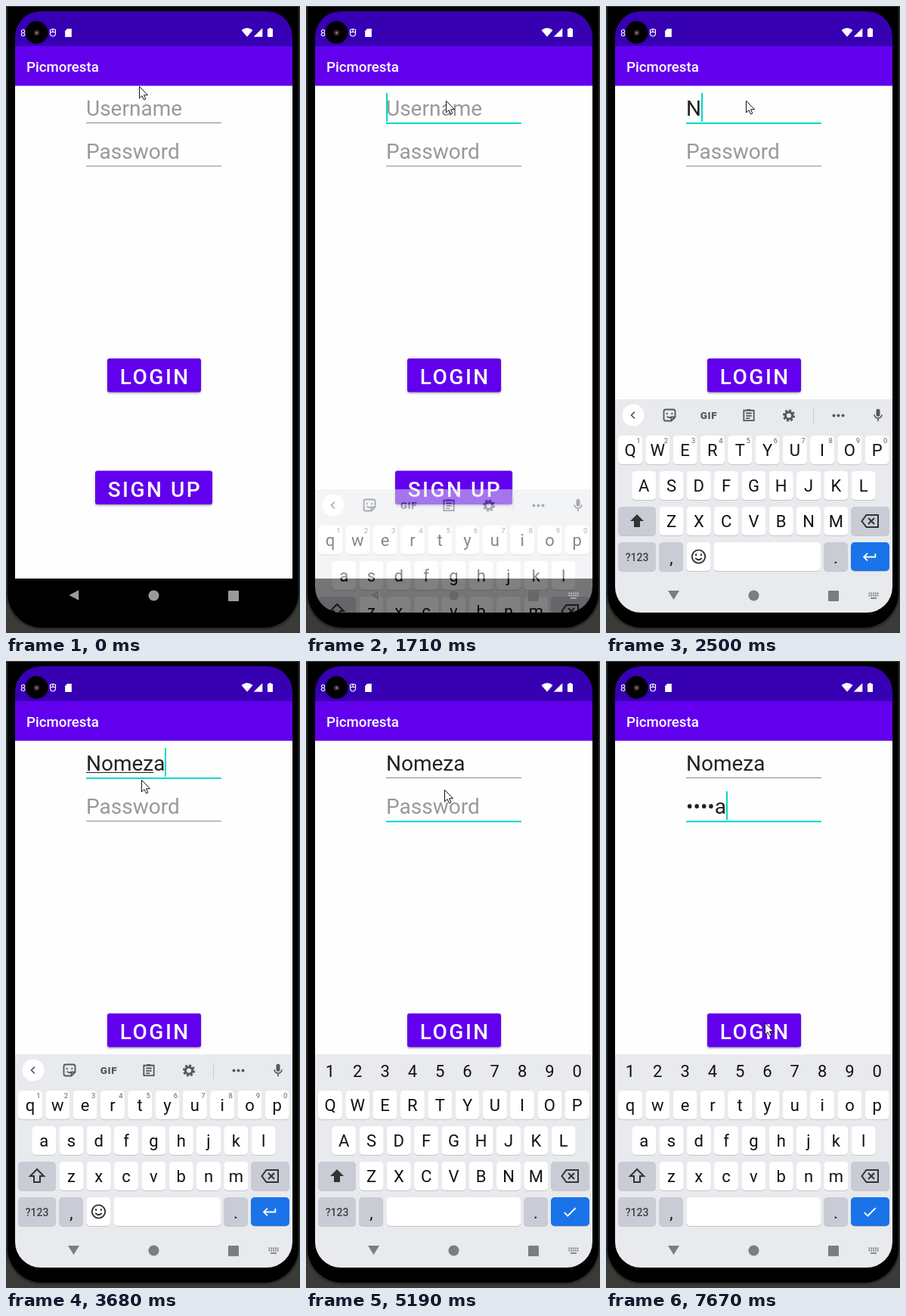
Animation, 389 px wide and 829 px high, one loop 8 s. Source, as an HTML page with a canvas:

```html
<!DOCTYPE html>
<html lang="en">
<head>
<meta charset="utf-8">
<title>Login screen</title>
<style>
  html, body { margin: 0; height: 100%; overflow: hidden; background: #000; }
  canvas { display: block; }
</style>
</head>
<body>
<canvas id="stage" width="389" height="829"></canvas>
<script>
const LOOP = 8000;
const APP = 'Picmoresta', USER = 'Nomeza';
const PURPLE = '#6200ee', TEAL = '#03dac5', INK = '#222', ICON = '#54575b';
const PITCH = 36.3;

const stage = document.getElementById('stage').getContext('2d');
const board = Object.assign(document.createElement('canvas'), { width: 389, height: 829 }).getContext('2d');
let ctx = stage;

// Value of the last [time, value] pair already reached
const at = (t, steps) => steps.reduce((v, [time, value]) => (t >= time ? value : v), null);
const within = (t, ...spans) => spans.some(([a, b]) => t >= a && t < b);

function box(x, y, w, h, fill, r = 0) {
  ctx.fillStyle = fill;
  ctx.beginPath();
  ctx.roundRect(x, y, w, h, r);
  ctx.fill();
}

function disc(x, y, r, fill) {
  box(x - r, y - r, 2 * r, 2 * r, fill, r);
}

function text(s, x, y, size, color, { weight = 400, align = 'left', spacing = 0 } = {}) {
  ctx.font = `${weight} ${size}px Roboto, sans-serif`;
  ctx.textAlign = align;
  ctx.letterSpacing = spacing + 'px';
  ctx.fillStyle = color;
  ctx.fillText(s, x, y);
  return ctx.measureText(s).width;
}

// Draws a path given on a 24 unit grid, centred on x, y
function icon(d, x, y, size, color, line = 0) {
  ctx.save();
  ctx.translate(x - size / 2, y - size / 2);
  ctx.scale(size / 24, size / 24);
  ctx.fillStyle = ctx.strokeStyle = color;
  ctx.lineWidth = line;
  const path = new Path2D(d);
  line ? ctx.stroke(path) : ctx.fill(path);
  ctx.restore();
}

const PATHS = {
  left: 'M15 5l-7 7 7 7',
  right: 'M9 5l7 7-7 7',
  sticker: 'M15 21H6a3 3 0 0 1-3-3V6a3 3 0 0 1 3-3h12a3 3 0 0 1 3 3v9zM15 21v-6h6M8 8v3M16 8v3M8 14q3 3 6 1',
  clipboard: 'M4 4.500h16v16H4zM9 3.500h6M7.500 9h9M7.500 13h9M7.500 17h6',
  micHead: 'M12 14a3 3 0 0 0 3-3V5a3 3 0 0 0-6 0v6a3 3 0 0 0 3 3z',
  micStand: 'M6 11a6 6 0 0 0 12 0M12 17v5',
  shift: 'M12 3L3 12h5v8h8v-8h5z',
  erase: 'M7.500 4H23v16H7.500L1.500 12zM10 8l8 8M18 8l-8 8',
  enter: 'M19 7v4H5.830l3.580-3.590L8 6l-6 6 6 6 1.410-1.410L5.830 13H21V7z',
  check: 'M9 16.170L4.830 12l-1.420 1.410L9 19 21 7l-1.410-1.410z',
  smile: 'M12 3a9 9 0 1 0 .01 0M7.500 14q4.500 5 9 0M8.500 8v3M15.500 8v3',
  wifi: 'M12 21L0 7q12-9 24 0z',
  signal: 'M2 22h20V2z',
  card: 'M9 2h11v20H4V8z',
  back: 'M21 3v18L4 12z',
  down: 'M2 4h20L12 20z'
};

function navBar(color, open, bar = true) {
  icon(open ? PATHS.down : PATHS.back, 89.5, 779, 18, color);
  disc(195.5, 779.5, 7, color);
  box(294, 773, 14, 14, color, 1);
  if (!bar) return;
  for (let i = 0; i < 10; i++) box(347.5 + (i % 5) * 2.8, 775.5 + (i > 4) * 3, 1.8, 2, color);
  box(350, 782, 8, 1.8, color);
}

function frame() {
  box(0, 0, 389, 829, '#3a3a36');
  box(0, 1, 389, 824, '#2b2b29', [0, 0, 48, 48]);
  box(2, 1, 385, 821, '#000', [0, 0, 46, 46]);
}

function statusBar() {
  box(12, 7, 367, 46, '#3700b3');
  text('8', 19, 40, 13, '#fff');
  disc(40.5, 35, 15, '#000');
  disc(40.5, 35.5, 4, '#2b2421');
  disc(40.5, 35.5, 1.7, '#8a7468');
  icon('M5 5q7-4 14 0v8q0 9-7 9t-7-9zM5 11h14M12 4v7', 62, 35, 12, '#fff', 2.4);
  icon(PATHS.card, 82.5, 35.5, 13, '#fff');
  icon(PATHS.wifi, 319, 35, 15, '#fff');
  icon(PATHS.signal, 333.5, 35, 14, '#fff');
  box(346, 30, 7, 11, '#fff', 1);
  box(348, 29, 3, 2, '#fff');
}

function field(y, hint, value, focused, caret) {
  const width = value ? text(value, 106, y + 30, 28, INK) : 0;
  if (!value) text(hint, 106, y + 30, 28, '#999');
  box(106, y + 39, 179, focused ? 2 : 1, focused ? TEAL : '#858585');
  if (caret) box(106 + Math.round(width), y, 2, 38, TEAL);
}

function button(label, x, y, w) {
  ctx.save();
  ctx.shadowColor = 'rgba(0,0,0,.35)';
  ctx.shadowBlur = 3;
  ctx.shadowOffsetY = 1.5;
  box(x, y, w, 44.5, PURPLE, 3);
  ctx.restore();
  text(label, x + 16.7, y + 34, 28, '#fff', { weight: 500, spacing: 2.5 });
}

function key(x, y, w, fill = '#fff') {
  box(x, y + 1, w, 38, '#c2c5ca', 5);
  box(x, y, w, 38, fill, 5);
}

function letters(row, x, y, caps, hints) {
  [...row].forEach((c, i) => {
    const cx = x + i * PITCH;
    key(cx - 16, y, 32);
    text(caps ? c.toUpperCase() : c, cx, y + 27, 22, '#111', { align: 'center' });
    if (hints) text((i + 1) % 10, cx + 11, y + 10, 9.5, '#5f6368', { align: 'center' });
  });
}

function gear(x, y) {
  ctx.strokeStyle = ICON;
  for (const [r, w, dash] of [[4.6, 3, []], [6.8, 2.6, [3, 2.34]]]) {
    ctx.lineWidth = w;
    ctx.setLineDash(dash);
    ctx.beginPath();
    ctx.arc(x, y, r, 0, 2 * Math.PI);
    ctx.stroke();
  }
  ctx.setLineDash([]);
}

function toolbar(t) {
  const words = at(t, [[0, null], [3940, [USER, 'Nomads', 'Names']], [4200, ['Nomadic', 'Normal', 'Numbers']]]);
  disc(36, 541, 14.5, '#fff');
  icon(words ? PATHS.right : PATHS.left, 36, 541, 15, ICON, 2.6);
  if (words) {
    words.forEach((w, i) => text(w, 106 + i * 92, 547, 17, '#333', { align: 'center' }));
  } else {
    icon(PATHS.sticker, 84, 541, 20, ICON, 2.2);
    text('GIF', 136, 546, 13.5, ICON, { weight: 900, align: 'center', spacing: .6 });
    icon(PATHS.clipboard, 189, 541, 20, ICON, 2.2);
    gear(242, 541.5);
    box(274, 531, 1, 21, '#c8cacf');
    for (const x of [301.5, 307.5, 313.5]) disc(x, 541.5, 2, ICON);
  }
  icon(PATHS.micHead, 360, 541, 20, ICON);
  icon(PATHS.micStand, 360, 541, 20, ICON, 2);
}

function keyboard(t, open) {
  const secret = t >= 4920;
  const caps = within(t, [2110, 2620], [5070, 5680]);
  const grey = '#c9ccd4';
  box(0, 520, 389, 309, '#e8eaed');
  if (secret) [...'1234567890'].forEach((d, i) => text(d, 32 + i * PITCH, 550, 22, '#111', { align: 'center' }));
  else toolbar(t);

  letters('qwertyuiop', 32, 568, caps, !secret);
  letters('asdfghjkl', 50.2, 615, caps);
  letters('zxcvbnm', 86.5, 662, caps);
  key(16, 662, 50, grey);
  icon(PATHS.shift, 41, 681, 24, '#333', caps ? 0 : 2);
  key(324, 662, 51, grey);
  icon(PATHS.erase, 349, 681, 24, '#333', 2);

  key(16, 709, 50, grey);
  text('?123', 41, 734, 14, '#3c4043', { weight: 500, align: 'center' });
  key(70, 709, 32, grey);
  text(',', 86.5, 737, 22, '#111', { align: 'center' });
  if (!secret) {
    key(106.5, 709, 32);
    icon(PATHS.smile, 122.5, 728, 23, '#333', 2);
  }
  const left = secret ? 106.5 : 142.5;
  key(left, 709, 284 - left);
  key(288, 709, 32, grey);
  text('.', 304, 737, 22, '#111', { align: 'center' });
  key(324, 709, 51, '#1a73e8');
  icon(secret ? PATHS.check : PATHS.enter, 349, 728.5, 22, '#fff');
  if (open) navBar('#7c7d80', true);
}

function pointer([x, y]) {
  ctx.save();
  ctx.translate(x + .5, y + .5);
  const arrow = new Path2D('M0 0V15.500L3.500 12.200 6 17.500 8.300 16.500 6 11.300H11z');
  ctx.fillStyle = '#fff';
  ctx.strokeStyle = '#111';
  ctx.lineWidth = 1;
  ctx.fill(arrow);
  ctx.stroke(arrow);
  ctx.restore();
}

function render(t) {
  const typed = at(t, [[0, 0], [2500, 1], [2910, 2], [3060, 3], [3180, 4], [3330, 5], [3680, 6]]);
  const secret = at(t, [[0, ''], [5680, 'a'], [6050, '•a'], [6300, '••a'], [6430, '•••a'], [6560, '••••a']]);
  const [drop, alpha] = at(t, [[0, [282, 0]], [1590, [220, .15]], [1710, [119, .5]], [1870, [20, .9]], [1990, [0, 1]]]);
  const open = drop === 0;

  frame();
  ctx.save();
  ctx.beginPath();
  ctx.roundRect(12, 7, 367, 795, 34);
  ctx.clip();

  box(12, 105, 367, 652, '#fefefe');
  statusBar();
  box(12, 53, 367, 52.5, PURPLE);
  text(APP, 27, 87, 18.7, '#fff', { weight: 500 });

  field(115, 'Username', USER.slice(0, typed), within(t, [670, 4480]),
    within(t, [670, 1050], [1590, 2110], [2500, 4480]));
  if (within(t, [2910, 4200])) {
    ctx.font = '28px Roboto, sans-serif';
    const composed = USER.slice(0, t < 3800 ? typed - 1 : typed);
    box(106, 147, ctx.measureText(composed).width, 1, INK);
  }
  field(172.3, 'Password', secret, t >= 4800, within(t, [4800, 5190], [5680, 7090], [7550, LOOP]));
  button('LOGIN', 134, 466, 124);
  button('SIGN UP', 118, 614.5, 155);

  box(12, 757, 367, 45, '#000');
  navBar('#9a9a9a', false, t >= 860);
  if (alpha) {
    ctx = board;
    ctx.clearRect(0, 0, 389, 829);
    keyboard(t, open);
    ctx = stage;
    ctx.globalAlpha = alpha;
    ctx.drawImage(board.canvas, 0, drop);
    ctx.globalAlpha = 1;
    if (!open) navBar('#686868', false, false);
  }
  ctx.restore();

  pointer(at(t, [
    [0, [176, 106]], [150, [181, 116]], [270, [185, 125]], [3560, [179, 157]], [4080, [183, 170]],
    [7090, [200, 200]], [7210, [228, 300]], [7330, [236, 400]], [7550, [220, 466]], [7670, [210, 478]]
  ]));
}

function tick(now) {
  render(now % LOOP);
  requestAnimationFrame(tick);
}
render(0);
requestAnimationFrame(tick);
</script>
</body>
</html>
```
